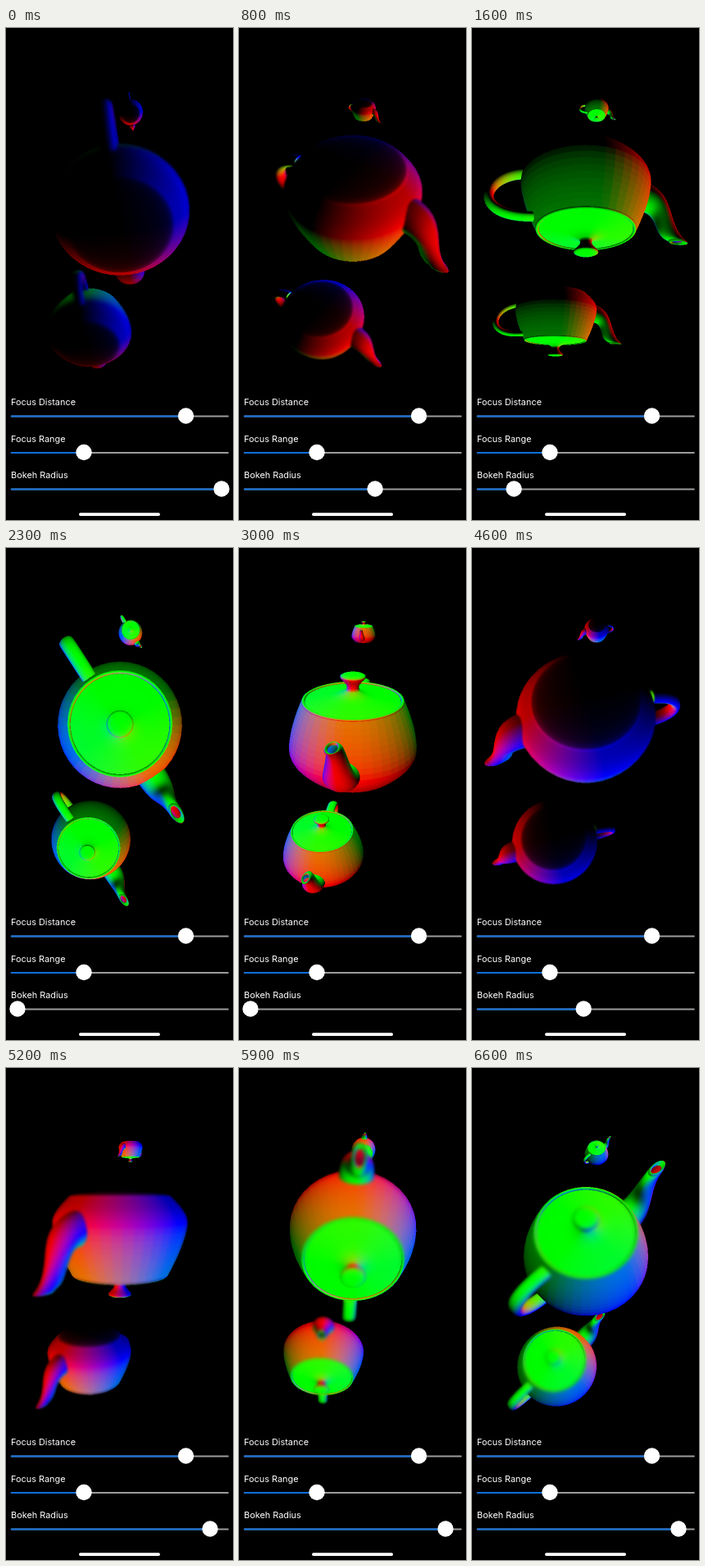
Write an HTML page with a canvas that moves like this. It is 277 px wide and 600 px high and loops after 6.7 s.

```html
<!DOCTYPE html>
<html lang="en">
<head>
<meta charset="utf-8">
<title>Depth of field</title>
<style>
  html, body { margin: 0; width: 100%; height: 100%; overflow: hidden; background: #000; }
  canvas, svg { position: absolute; left: 0; top: 0; width: 277px; height: 600px; display: block; }
  text { font: 10.9px Inter, Roboto, sans-serif; fill: #fff; }
  .track { stroke: #9c9c9f; stroke-width: 2; stroke-linecap: round; }
  .fill { stroke: #0f6fdc; stroke-width: 2; stroke-linecap: round; }
  circle, rect { fill: #fff; }
</style>
</head>
<body>
<canvas id="scene" width="554" height="1200"></canvas>
<svg id="ui" viewBox="0 0 277 600"><rect x="89" y="591.2" width="99" height="3.7" rx="1.85"/></svg>
<script>
const LOOP = 6700, STEP = 100;
const W = 554, H = 1200, SS = 2, FOCAL = 450;
const { PI, sin, cos, min, max, abs, hypot } = Math;
const RAD = PI / 180;

// Screen centre and pixels per model unit
const POTS = [
  { x: 139, y: 217, s: 40, soft: 1 },
  { x: 102.5, y: 360, s: 25, soft: 0.9 },
  { x: 152, y: 102, s: 7.3, soft: 0 }
];

// ---------- Teapot mesh ----------
const verts = [], quads = [];

const clamp = (v, lo, hi) => min(hi, max(lo, v));
const sub = (a, b) => a.map((v, i) => v - b[i]);
const unit = v => {
  const l = hypot(...v) || 1;
  return v.map(c => c / l);
};
const cross = (a, b) => [a[1] * b[2] - a[2] * b[1], a[2] * b[0] - a[0] * b[2], a[0] * b[1] - a[1] * b[0]];
const bezier = (p, t) => {
  const k = 1 - t, f = [k * k * k, 3 * k * k * t, 3 * k * t * t, t * t * t];
  return [0, 1].map(i => f.reduce((sum, w, j) => sum + w * p[j][i], 0));
};

// section(u) gives the centre, the in-plane half axis and the half width along z.
// tile blends from smooth (0) to flat (1) shading.
function sweep(section, rows, segs, tile = 0) {
  const at = (u, v) => {
    const { c, h, w } = section(u);
    return [c[0] + h[0] * cos(v), c[1] + h[1] * cos(v), w * sin(v)];
  };
  const e = 0.002;
  const normal = (u, v) => {
    const k = clamp(u, 2 * e, 1 - 2 * e);
    return unit(cross(sub(at(k + e, v), at(k - e, v)), sub(at(k, v + e), at(k, v - e))));
  };
  for (let i = 0; i < rows; i++) {
    for (let j = 0; j < segs; j++) {
      const mid = normal((i + 0.5) / rows, (j + 0.5) / segs * 2 * PI);
      quads.push([[0, 0], [1, 0], [1, 1], [0, 1]].map(([a, b]) => {
        const u = (i + a) / rows, v = (j + b) / segs * 2 * PI;
        const p = at(u, v);
        p[1] -= 1.575;
        return verts.push({ p, n: unit(normal(u, v).map((c, k) => c + (mid[k] - c) * tile)) }) - 1;
      }));
    }
  }
}

function lathe(radius, height, rows, tile) {
  sweep(u => ({ c: [0, height(u)], h: [radius(u), 0], w: radius(u) }), rows, 44, tile);
}

const quarter = u => sin(u * PI / 2);

// Foot, belly, shoulder, lip, lid, knob
lathe(u => 1.5 * quarter(u), u => 0.15 * (1 - cos(u * PI / 2)), 6);
lathe(u => 1.5 + 0.5 * quarter(u), u => 0.15 + 0.75 * u, 9);
lathe(u => 2 - 0.5 * u ** 1.5, u => 0.9 + 1.5 * u, 9, 0.75);
lathe(u => 1.45 + 0.05 * cos(u * PI), u => 2.4 + 0.05 * sin(u * PI), 5);
lathe(u => 1.4 - 1.2 * u, u => 2.41 + 0.14 * quarter(u) + 0.15 * u ** 6, 12);
lathe(u => 0.2 * (1 - u) ** 3 + 2.4 * u * u * (1 - u), u => 2.7 + 0.45 * quarter(u), 10);

// Spout: the section turns from upright to level while it narrows
const spoutPath = [[1.7, 0.94], [2.85, 1.06], [2.35, 2.06], [3, 2.4]];
sweep(u => {
  const turn = (u - 1) * PI / 2, k = 1 - u, size = 0.3 + 0.19 * k ** 3;
  return {
    c: bezier(spoutPath, u),
    h: [size * cos(turn), size * sin(turn)],
    w: 0.19 + 0.31 * k * k * (1 + 2 * u)
  };
}, 16, 22);
sweep(u => ({
  c: [3 + 0.06 * sin(u * PI), 2.4 + 0.07 * sin(u * PI)],
  h: [0.3 + 0.05 * sin(u * PI) - 0.1 * u, 0],
  w: 0.19 - 0.08 * u
}), 5, 22);

// Handle: an oval section square to its path
const handlePath = [[-1.55, 2.14], [-3.4, 2.4], [-3.1, 1], [-1.95, 0.75]];
sweep(u => {
  const [dx, dy] = unit(sub(bezier(handlePath, u + 0.001), bezier(handlePath, u - 0.001)));
  const size = 0.12 + 0.04 * u;
  return { c: bezier(handlePath, u), h: [size * dy, -size * dx], w: 0.225 };
}, 24, 20);

// ---------- Rasteriser ----------
const layer = () => Object.assign(document.createElement('canvas'), { width: W, height: H }).getContext('2d');
const ctx = document.getElementById('scene').getContext('2d');
const base = layer(), mask = layer(), glow = layer();
const colour = base.createImageData(W, H), focus = mask.createImageData(W, H);
const depth = new Float32Array(W * H);

function triangle(a, b, c) {
  const area = (b.x - a.x) * (c.y - a.y) - (b.y - a.y) * (c.x - a.x);
  if (abs(area) < 1e-6) return;
  const x0 = max(0, Math.ceil(min(a.x, b.x, c.x) - 0.5));
  const x1 = min(W - 1, Math.floor(max(a.x, b.x, c.x) - 0.5));
  const y0 = max(0, Math.ceil(min(a.y, b.y, c.y) - 0.5));
  const y1 = min(H - 1, Math.floor(max(a.y, b.y, c.y) - 0.5));
  const px = colour.data, f = focus.data;
  for (let y = y0; y <= y1; y++) {
    for (let x = x0; x <= x1; x++) {
      const dx = x + 0.5, dy = y + 0.5;
      const u = ((b.x - dx) * (c.y - dy) - (b.y - dy) * (c.x - dx)) / area;
      const v = ((c.x - dx) * (a.y - dy) - (c.y - dy) * (a.x - dx)) / area;
      const w = 1 - u - v;
      if (u < -1e-6 || v < -1e-6 || w < -1e-6) continue;
      const i = y * W + x, z = u * a.z + v * b.z + w * c.z;
      if (z <= depth[i]) continue;
      depth[i] = z;
      for (let k = 0; k < 3; k++) px[i * 4 + k] = 255 * max(0, u * a.n[k] + v * b.n[k] + w * c.n[k]);
      f[i * 4 + 3] = 255 * (u * a.m + v * b.m + w * c.m);
    }
  }
}

function drawPot(pot, tilt, spin) {
  const ct = cos(tilt), st = sin(tilt), cs = cos(spin), sn = sin(spin);
  const ox = (pot.x - 138.5) / pot.s, oy = (300 - pot.y) / pot.s, far = FOCAL / pot.s;
  const pts = verts.map(({ p: [x, y, z], n }) => {
    const rx = x * cs + z * sn, rz = z * cs - x * sn;
    const near = y * st + rz * ct, iz = 1 / (far - near);
    return {
      x: SS * (138.5 + FOCAL * (ox + rx) * iz),
      y: SS * (300 - FOCAL * (oy + y * ct - rz * st) * iz),
      z: iz, n,
      m: pot.soft * clamp((abs(near) - 0.4) / 0.9, 0, 1)
    };
  });
  for (const [a, b, c, d] of quads) {
    triangle(pts[a], pts[b], pts[c]);
    triangle(pts[a], pts[c], pts[d]);
  }
}

function drawScene(t, bokeh) {
  depth.fill(0);
  new Uint32Array(colour.data.buffer).fill(0xff000000);
  focus.data.fill(0);
  for (const pot of POTS) drawPot(pot, (305.7 - 90 * t) * RAD, (81.1 - 60 * t) * RAD);
  base.putImageData(colour, 0, 0);
  ctx.drawImage(base.canvas, 0, 0);
  if (bokeh < 0.03) return;

  // Blend a blurred copy over the out-of-focus parts
  mask.putImageData(focus, 0, 0);
  glow.globalCompositeOperation = 'source-over';
  glow.clearRect(0, 0, W, H);
  glow.filter = `blur(${4.2 * bokeh}px)`;
  for (let i = 0; i < 3; i++) glow.drawImage(mask.canvas, 0, 0);
  glow.globalCompositeOperation = 'source-in';
  glow.drawImage(base.canvas, 0, 0);
  ctx.drawImage(glow.canvas, 0, 0);
}

// ---------- Sliders ----------
const ui = document.getElementById('ui');
function node(tag, attrs, label = '') {
  const el = document.createElementNS('http://www.w3.org/2000/svg', tag);
  for (const k in attrs) el.setAttribute(k, attrs[k]);
  el.textContent = label;
  return ui.appendChild(el);
}
function slider(label, y, x) {
  const line = { x1: 6.8, x2: 270.8, y1: y + 0.6, y2: y + 0.6 };
  node('text', { x: 6, y: y - 12.8 }, label);
  node('line', { class: 'track', ...line });
  const fill = node('line', { class: 'fill', ...line });
  const thumb = node('circle', { cy: y, r: 9.7 });
  const set = v => {
    fill.setAttribute('x2', v);
    thumb.setAttribute('cx', v);
  };
  set(x);
  return set;
}
slider('Focus Distance', 473, 219.5);
slider('Focus Range', 517.5, 95);
const setBokeh = slider('Bokeh Radius', 562, 263);

// Dragged down to the minimum with growing speed, later back up evenly
const dragAt = t => t < 3
  ? max(14, 263 - 110 * t - 14 * t * t)
  : clamp(14 + 188 * (t - 3.95), 14, 252);

// ---------- Playback ----------
const start = performance.now();
let shown = -1;
function tick() {
  const step = Math.floor((performance.now() - start) % LOOP / STEP);
  if (step !== shown) {
    shown = step;
    const t = step * STEP / 1000, x = dragAt(t);
    setBokeh(x);
    drawScene(t, (x - 14) / 249);
  }
  requestAnimationFrame(tick);
}
tick();
</script>
</body>
</html>
```
